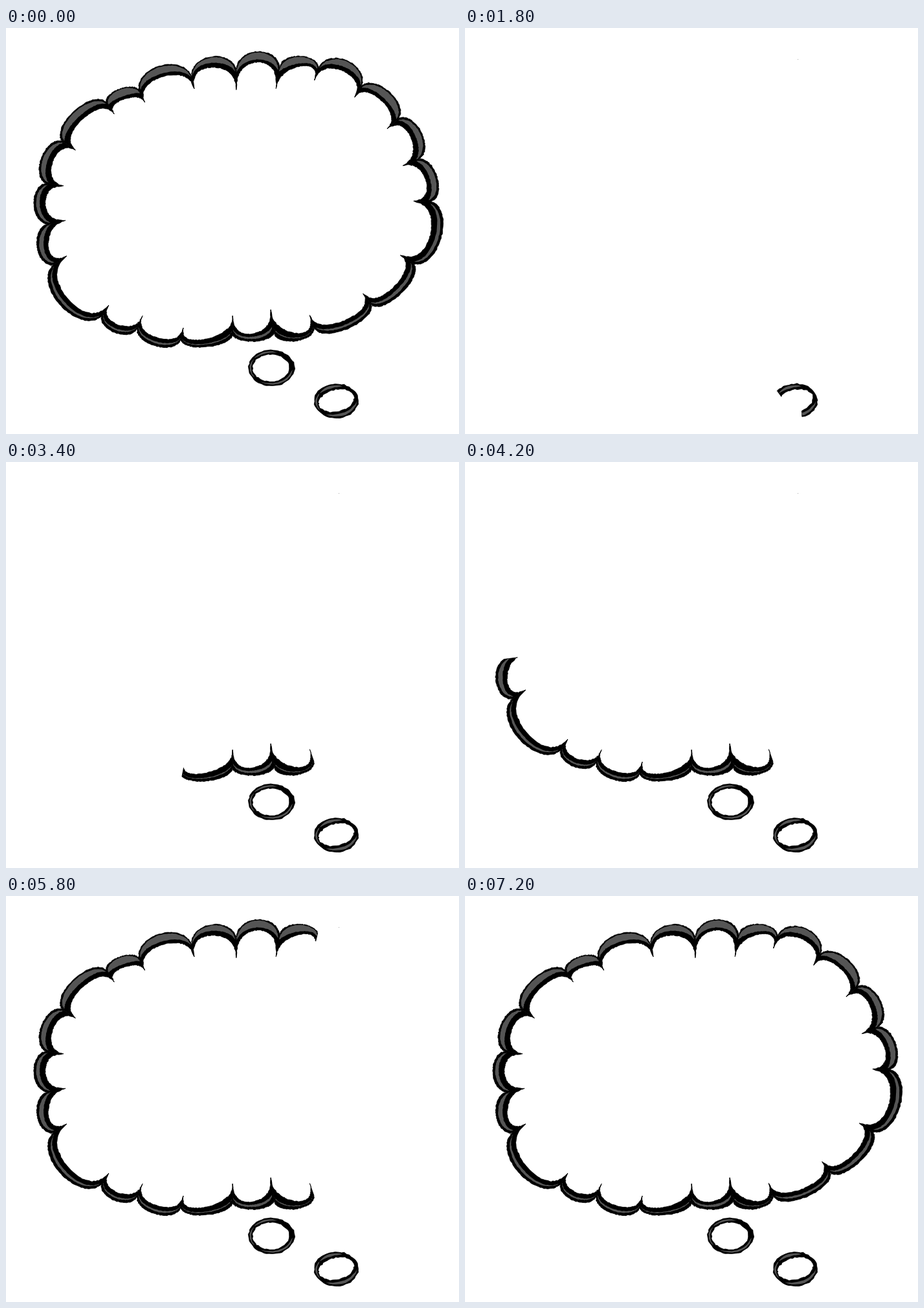
These frames come from a looping animation (700x627 px, 7.4 s). An HTML page with a canvas:

```html
<!DOCTYPE html>
<html lang="en">
<head>
<meta charset="utf-8">
<title>Thought bubble</title>
<style>
  html, body { margin: 0; width: 100%; height: 100%; overflow: hidden; background: #fff; }
  canvas { display: block; }
</style>
</head>
<body>
<canvas id="stage" width="700" height="627"></canvas>
<script>
const ctx = document.getElementById('stage').getContext('2d');
const STEP = 200, LOOP = 7400;
const FADE = 5, SMALL = 6, BIG = 11, CLOUD = 14, LAST = 36; // steps at which parts begin

// Outer notches in drawing order (x, y) and the bulge of the scallop that follows
const notches = [
  [476, 463, 17], [414, 470, 13], [350, 472, 16], [270, 481, 20], [203, 463, 18],
  [148, 445, 35], [73, 366, 22], [66, 303, 21], [62, 240, 21], [87, 175, 23],
  [155, 115, 13], [206, 97, 29], [287, 76, 27], [356, 66, 27], [423, 61, 18],
  [483, 62, 28], [549, 90, 22], [606, 140, 23], [637, 203, 20], [657, 268, 30],
  [630, 364, 20], [564, 427, 21]
];

const mix = (a, b, k) => a + (b - a) * k;
const mixPoint = (p, q, k) => [mix(p[0], q[0], k), mix(p[1], q[1], k)];
const clamp = k => Math.max(0, Math.min(1, k));
const noise = n => {
  const s = Math.sin(n * 12.9898) * 43758.5453;
  return (s - Math.floor(s)) * 2 - 1;
};

// Tips point into the cloud, deeper at the sides and near the tail
function tip([x, y]) {
  const dx = (355 - x) / 300 ** 2, dy = (265 - y) / 220 ** 2;
  const len = Math.hypot(dx, dy);
  const depth = 18 + 9 * (dx / len) ** 2 + 20 * Math.exp(-(((x - 395) / 50) ** 2));
  return [x + depth * dx / len, y + depth * dy / len];
}

// Half ellipse from p to q over the top m; a lower power makes it fuller
function arch(p, q, m, t, power) {
  const c = Math.cos(t * Math.PI), s = Math.sin(t * Math.PI) ** power;
  const mid = mixPoint(p, q, 0.5);
  return mid.map((o, i) => o + (p[i] - o) * c + (m[i] - o) * s);
}

// A band's edge maps t (along) and v (0 outside, 1 inside) to a point
function scallop(p, i) {
  const q = notches[(i + 1) % notches.length], bulge = p[2];
  const len = Math.hypot(q[0] - p[0], q[1] - p[1]);
  const nx = (q[1] - p[1]) / len, ny = (p[0] - q[0]) / len;
  const thick = 14 + 4 * Math.abs(nx) - 2 * ny;
  const top = h => [(p[0] + q[0]) / 2 + nx * h, (p[1] + q[1]) / 2 + ny * h];
  const a = tip(p), b = tip(q);
  return {
    edge: (t, v) => mixPoint(
      arch(p, q, top(bulge), t, 0.95), arch(a, b, top(bulge - thick), t, 0.68), v),
    rough: 0.6,
    streaks: [[0.06, 0.94]],
    start: 0.2 + 0.12 * ny,
    wide: 0.38 - 0.18 * ny + 0.1 * noise(i)
  };
}

function ring(outer, inner, slant) {
  const edge = (t, v) => {
    const a = (215 / 180 + 2 * t) * Math.PI;
    const c = Math.cos(a), s = Math.sin(a);
    const [x, y, rx, ry] = outer.map((k, i) => mix(k, inner[i], v));
    return [x + rx * c, y + ry * s - slant * v * c];
  };
  return { edge, rough: 0.9, streaks: [[0, 0.2], [0.42, 0.74], [0.8, 1]], start: 0.25, wide: 0.4 };
}

function fillStrip(edge, from, to, lo, hi, rough, color) {
  const n = Math.max(4, Math.ceil(48 * (to - from)));
  const add = (i, v) => {
    const [x, y] = edge(mix(from, to, i / n), v);
    ctx.lineTo(x + noise(x + y * 3) * rough, y + noise(x * 5 + y) * rough);
  };
  ctx.beginPath();
  for (let i = 0; i <= n; i++) add(i, lo(i / n));
  for (let i = n; i >= 0; i--) add(i, hi(i / n));
  ctx.closePath();
  ctx.fillStyle = color;
  ctx.fill();
}

function ink({ edge, rough }, done) {
  fillStrip(edge, 0, done, () => 0, () => 1, rough, '#000');
  ctx.lineWidth = 0.8;
  ctx.lineJoin = 'round';
  ctx.stroke();
}

// Tapered grey streaks, cut off where the drawing has got to
function shine({ edge, streaks, start, wide }, done) {
  for (const [t0, t1] of streaks) {
    const end = Math.min(t1, done);
    if (end <= t0) continue;
    const swell = k => Math.sin(Math.PI * clamp(k * (end - t0) / (t1 - t0))) ** 0.6;
    const mid = start + wide * 0.4;
    fillStrip(edge, t0, end, k => mix(mid, start, swell(k)),
      k => mix(mid, start + wide, swell(k)), 0.4, '#555');
  }
}

const cloud = notches.map(scallop);
const smallRing = ring([510.5, 576, 34, 26.5], [510.5, 575.5, 27.5, 17.5], 4);
const bigRing = ring([410.5, 525, 35.5, 27.5], [409.5, 525, 28.5, 21], 0);

// Draws bands one after another; count says how many are finished
function drawBands(bands, count) {
  for (const paint of [ink, shine]) {
    bands.forEach((band, i) => {
      if (count > i) paint(band, clamp(count - i));
    });
  }
}

function draw(step) {
  const whole = step <= FADE || step === LAST;
  ctx.fillStyle = '#fff';
  ctx.fillRect(0, 0, 700, 627);
  ctx.fillStyle = '#aaa';
  ctx.fillRect(514, 48, 1, 1);
  drawBands([smallRing], whole ? 1 : (step - SMALL) / (BIG - SMALL));
  drawBands([bigRing], whole ? 1 : (step - BIG) / (CLOUD - BIG));
  drawBands(cloud, whole ? cloud.length : step - CLOUD - 0.08);
  if (step === FADE) {
    ctx.fillStyle = 'rgba(255,255,255,.75)';
    ctx.fillRect(0, 0, 700, 627);
  }
}

let shown = -1;
function tick() {
  const step = Math.floor(performance.now() % LOOP / STEP);
  if (step !== shown) draw(shown = step);
  requestAnimationFrame(tick);
}
tick();
</script>
</body>
</html>
```
